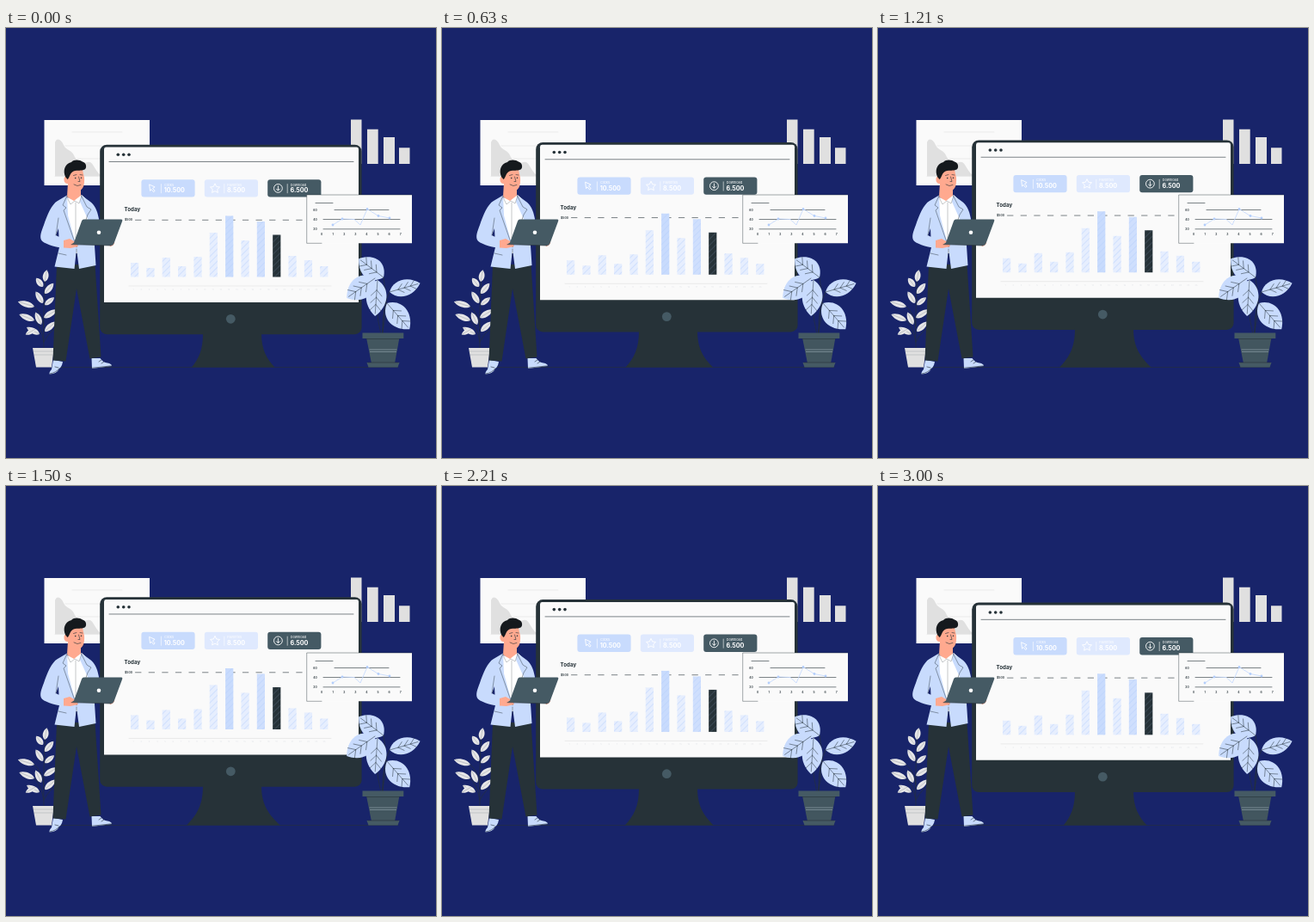
Write an HTML page that moves like this. It is 500 px wide and 500 px high and loops after 3.04 s.

```html
<!DOCTYPE html>
<html lang="en">
<head>
<meta charset="utf-8">
<title>Dashboard</title>
<style>
html, body { margin: 0; width: 100%; height: 100%; overflow: hidden; background: #18246a; }
svg { display: block; width: 100%; height: 100%; font-family: Inter, Lato, sans-serif; }
.dark { fill: #263238; }
.slate { fill: #455a64; }
.paper { fill: #fafafa; }
.grey { fill: #e0e0e0; }
.blue { fill: #c8dbfd; }
.skin { fill: #ffa98f; }
.line { fill: none; stroke: #263238; stroke-width: .6; stroke-linecap: round; stroke-linejoin: round; }
.white { fill: none; stroke: #fff; stroke-width: .9; stroke-linejoin: round; }
.pale { stroke: #e4e4e4; stroke-width: .7; }
</style>
</head>
<body>
<svg viewBox="0 0 500 500">
  <defs>
    <pattern id="hatch" width="5" height="5" patternUnits="userSpaceOnUse" patternTransform="rotate(45)">
      <path d="M0 0V5" stroke="#b4cefa" stroke-opacity=".55" stroke-width="2"/>
    </pattern>
    <clipPath id="floor"><path d="M0 0H500V394.5H0z"/></clipPath>
  </defs>

  <!-- back panels -->
  <path class="paper" d="M44.5 107H167V183H44.5z"/>
  <path class="line pale" d="M77 121H135M69 137H135M83 152H135M57 172.500H150"/>
  <path class="grey" d="M57 172V133C59 127 64 129 67 136S76 141 79 148 88 158 95 156 103 168 112 172z"/>
  <path class="grey" d="M401 106.500h12.500V158H401zM420 117.800h12.700V158H420zM439 127h13V158h-13zM457 139.300h12.500V158H457z"/>
  <path class="line" d="M52 394.500H456"/>

  <!-- monitor -->
  <g clip-path="url(#floor)"><g id="monitor">
    <path class="dark" d="M229 355H297C297 378 306 389 320 402H209C222 389 229 378 229 355z"/>
    <rect class="dark" x="109.200" y="135.700" width="304.400" height="220.500" rx="8"/>
    <path class="paper" d="M114 319V141Q114 138.600 116.500 138.600H407.500Q410 138.600 410 141V319z"/>
    <circle class="slate" cx="261.300" cy="338.300" r="5.400"/>
    <g class="dark"><circle cx="130.300" cy="147.200" r="1.800"/><circle cx="136.700" cy="147.200" r="1.800"/><circle cx="143" cy="147.200" r="1.800"/></g>
    <path class="line" d="M120 155.500H404"/>
    <g id="cards"></g>
    <g class="dark">
      <text x="137.600" y="213.300" font-size="6.200" font-weight="700">Today</text>
      <text x="138" y="224.300" font-size="3.500" font-weight="600">$500</text>
    </g>
    <path class="line" d="M150.500 223.300H348" stroke-dasharray="6.500 9.100"/>
    <path class="line pale" d="M143 300H378"/>
    <g id="bars"></g>
  </g></g>

  <!-- small chart -->
  <path class="paper" d="M349.700 194H472V250.300H349.700z"/>
  <path class="line" d="M367 250.300H349.700V194H472" stroke-opacity=".7"/>
  <path class="line" d="M360 203.500H380M382 211.500H445M369 222.500H458M369 233.800H458"/>
  <path d="M380 229L391 222 405 222.500 412 229 420 210.500 433 218.500 446 221" fill="none" stroke="#c8dbfd" stroke-width=".9"/>
  <g id="axis" class="dark" font-size="3.400" font-weight="600" text-anchor="middle"></g>

  <g id="plants"></g>
  <path class="grey" d="M31 372H56L53 394.500H35z"/>
  <path class="line" d="M32 376H55M33 380H54" stroke="#fff" stroke-opacity=".25"/>
  <path class="dark" d="M419 360H457.500L452 390H425z" style="fill:#42565f"/>
  <path class="slate" d="M414.500 354.500H462.300V361H414.500zM419.500 389H457.500L455.500 394.500H421.500z"/>
  <path class="line" d="M419 361.500H457.500M421 389H456"/>
  <path d="M422.500 374H454.500M423 376.500H454" stroke="#8fa0a8" stroke-width=".7"/>

  <!-- man -->
  <path class="blue" d="M55 386L66 388Q65 394 62 396 59 402.500 50.500 402.500 50 400 53 397zM99.500 384H109.500Q113 389 118 389.500 123 390.500 123 393L100 396z"/>
  <path class="line" d="M51 402Q58 401 62 396M100 395.300L123 392.800M108 388l3-2M111 390l3-2M57 394l4 1" stroke="#fff"/>
  <path class="dark" d="M59 275H103.500L110.500 382.500 97.500 384.500 82 303 69.500 387.500 54.500 386.500z"/>
  <path class="skin" d="M72 180L87 184V197L80 204 71 196z"/>
  <path d="M70 196L79 201 88 194 101 206 96 262H72z" fill="#fff"/>
  <path class="blue" d="M71 194.500L60 201C53 205 48 217 44 229 41 237 39 242 41 246.500 43 250.500 56 254.500 66.500 256L68.500 246.500 58 241 61 233 62 255 56.500 277.500 79.500 280 82 257 85 280 104.500 276 103 253 108 222C106 211 103 206 98 202L87.500 194.500 86 202 95 222 82 255 72 218z"/>
  <path class="line" d="M71 195L66 206 70 209 67 212 82 255 95 217 99 211 94 208 87.500 195M58 241L61 221M82 257V266M61 262L70 264" stroke-opacity=".75"/>
  <path class="line" d="M70.500 196L75 205 80 201 85 204 88 195M81 203V244" stroke-opacity=".45"/>
  <path class="skin" d="M71 166Q80 160 89 165L91 174Q92 188 84 189.500 74 190 72 181 67 181 67.500 175 68 172 71 173z"/>
  <path d="M71.500 176L69 173C66 166 68 158 76 156 79 152.500 86 153 89 155.500 94 157 94 163 91.500 164.500 87 167 81 164 77 167.500 74 170 74 174 71.500 176z" fill="#15191d"/>
  <path class="line" d="M78.500 171.500l3.500-1M86 170.500l3 .5M84.500 173L86 178.500H84M79 182Q83 185 87 182.500"/>
  <g class="dark"><circle cx="80.700" cy="174.500" r=".8"/><circle cx="87.500" cy="174.200" r=".8"/></g>
  <path class="skin" d="M67 247L74 245 81 249 84 254 75 256 67 255.500zM119 249L126 247Q127 253 121 254z"/>
  <path class="slate" d="M90.500 222.500H134Q136 222.500 135 225L125.500 250.500Q124.500 253 122 253L76 251.500 79 249.500 88 224.500Q88.700 222.500 90.500 222.500z"/>
  <path class="line" d="M76 251.700L122 253"/>
  <circle cx="108" cy="237.700" r="2.300" fill="#fff"/>
</svg>
<script>
const $ = id => document.getElementById(id);
const text = (x, y, s, attrs = '') => `<text x="${x}" y="${y}" ${attrs}>${s}</text>`;

// Bars as height and colour; the default colour is pale blue.
const heights = [16.5, 10.5, 22.5, 12.5, 23.5, 51.5, 71, 42.5, 64.5, 49, 24.5, 19.5, 12.5];
const fills = { 6: '#c8dbfd', 8: '#cfdffd', 9: '#263238' };
$('bars').innerHTML = heights.map((h, i) => {
  const box = `x="${145 + i * 18.35}" y="${289.5 - h}" width="9.200" height="${h}"`;
  return `<rect ${box} fill="${fills[i] || '#e6eefe'}"/>` +
    `<rect ${box} fill="url(#hatch)" opacity="${i === 9 ? .25 : .8}"/>`;
}).join('') + Array.from({ length: 25 }, (_, i) =>
  text(148 + i * 9.25, 305, i + 1, 'font-size="2.600" fill="#e2e4e8" text-anchor="middle"')).join('');

const icons = [
  '<path d="M-3 -4.500L3.500 -1.500 1 0 3.500 3 2 4.300 -.5 1.200 -2 3z"/>',
  '<path d="M0 -5.500L1.700 -1.900 5.500 -1.400 2.700 1.300 3.400 5 0 3.200 -3.400 5 -2.700 1.300 -5.500 -1.400 -1.700 -1.900z"/>',
  '<circle r="4.900"/><path d="M0 -3V2.500M-2.200 .5L0 2.700 2.200 .5"/>'
];
const cards = [['#c8dbfd', 'Clicks', '10.500'], ['#dfe9fe', 'Favorites', '8.500'], ['#455a64', 'Download', '6.500']];
$('cards').innerHTML = cards.map(([fill, label, value], i) =>
  `<g transform="translate(${157.4 + i * 73.4} 176.200)">
    <rect width="62.200" height="20.400" rx="3" fill="${fill}"/>
    <g class="white"><g transform="translate(12.200 10.200)">${icons[i]}</g><path d="M23 5V16" stroke-width=".6"/></g>
    <g fill="#fff">${text(26.5, 7.4, label, 'font-size="3.900"')}${text(26.3, 15.2, value, 'font-size="7.200" font-weight="700"')}</g>
  </g>`).join('');

const dots = [[380, 229], [391, 222], [420, 210.5], [433, 218.5], [446, 221]];
$('axis').innerHTML =
  Array.from({ length: 8 }, (_, i) => text(367 + i * 13.1, 241, i)).join('') +
  [60, 40, 20].map((n, i) => text(359.5, 212.8 + i * 11.2, n)).join('') +
  dots.map(([x, y]) => `<circle cx="${x}" cy="${y}" r="1.400" fill="#b4cefa"/>`).join('');

// A leaf grows from (x, y) in the direction of its angle.
function leaf(x, y, length, width, angle, fill, veins) {
  const ribs = veins ? [.28, .48, .68].map(k =>
    `M${length * k} 0l${length * .16} ${-width * .3}M${length * k} 0l${length * .16} ${width * .3}`).join('') : '';
  return `<g transform="translate(${x} ${y}) rotate(${angle})">
    <path d="M0 0C${length * .2} ${-width * .75} ${length * .7} ${-width * .75} ${length} 0 ${length * .7} ${width * .75} ${length * .2} ${width * .75} 0 0" fill="${fill}"/>
    <path class="line" d="M0 0H${length * .93}${ribs}" stroke-opacity="${veins ? .8 : .3}"/></g>`;
}
const small = [
  [45, 295, 14, 6, -80], [43, 301, 13, 6, -128], [45, 309, 16, 6, -50],
  [43, 320, 16, 6, -122], [45, 322, 14, 5, -38], [33, 324, 20, 6, -163],
  [44, 337, 18, 6, -32], [33, 340, 19, 6, -158], [41, 345, 16, 6, -115],
  [39, 356, 17, 6, -152], [34, 350, 13, 5, 150], [45, 353, 17, 6, -42],
  [62, 347, 14, 5, -14]
];
const large = [
  [439, 290, 36, 22, -143], [429, 291, 40, 23, 145], [432, 293, 42, 21, 94],
  [446, 307, 37, 17, -16], [443, 320, 40, 22, 49]
];
$('plants').innerHTML =
  '<path class="line" d="M44 373Q43 330 46 289M44 365Q40 345 33 340M44 347Q42 332 33 324M44 365Q52 350 62 347"/>' +
  small.map(l => leaf(...l, '#e6e6e8')).join('') +
  '<path class="line" d="M437 356Q446 325 439 290M436 356Q428 325 432 293M438 356Q438 320 446 307M438 356Q438 330 443 320"/>' +
  large.map(l => leaf(...l, '#c8dbfd', true)).join('');

// The monitor rises and sinks at constant speed.
const LOOP = 3040, RISE = 6.6, start = performance.now();
function frame() {
  const p = (performance.now() - start) % LOOP / LOOP;
  const y = -RISE * (1 - Math.abs(1 - 2 * p));
  $('monitor').setAttribute('transform', `translate(0 ${y.toFixed(3)})`);
  requestAnimationFrame(frame);
}
frame();
</script>
</body>
</html>
```
